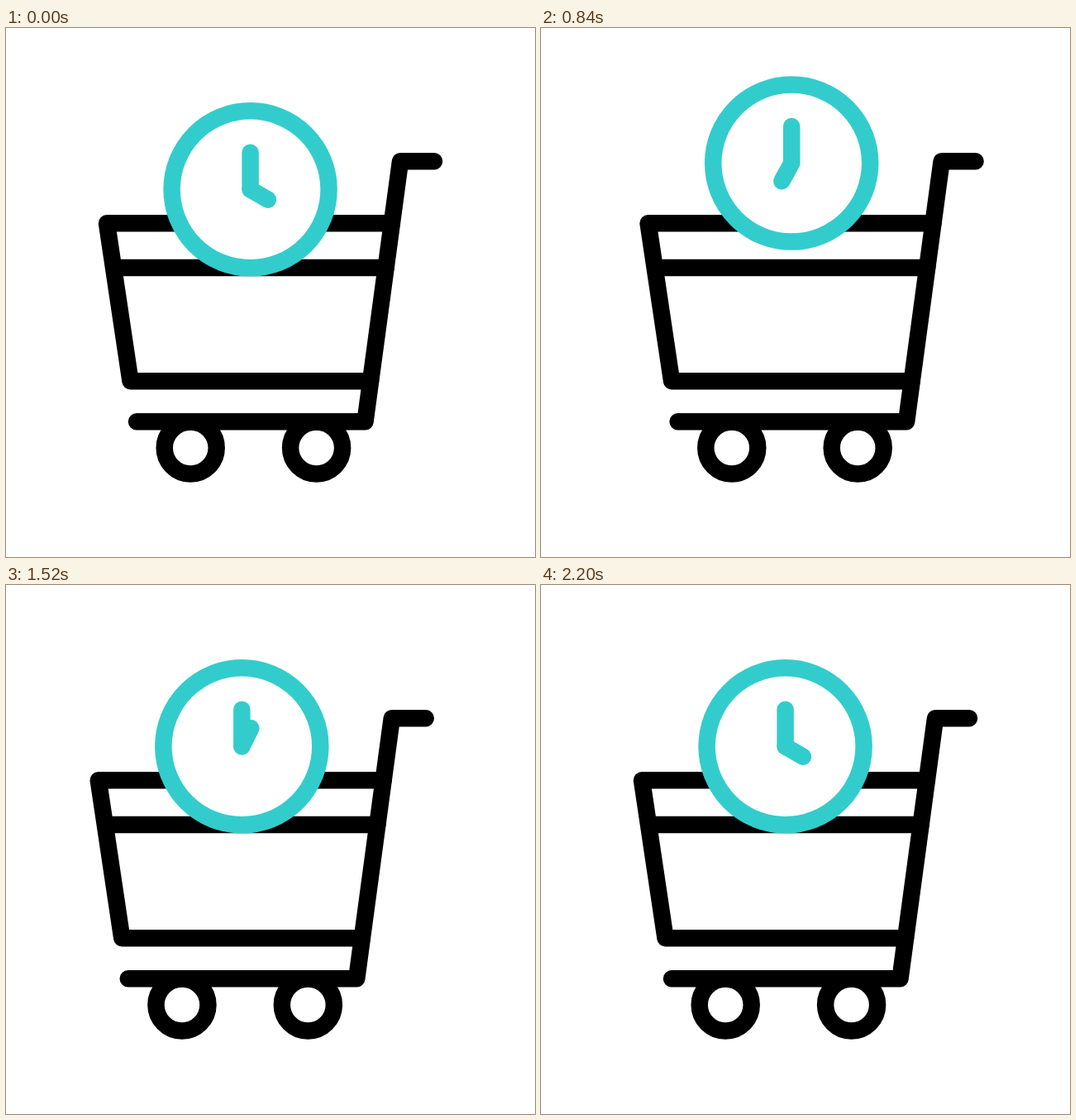
Animation of 640 by 640 pixels, one loop 2.4 s. Source, as an HTML page:

```html
<!DOCTYPE html>
<html lang="en">
<head>
<meta charset="utf-8">
<title>Shopping cart with clock</title>
<style>
  html, body { margin: 0; width: 100%; height: 100%; overflow: hidden; background: #fff; }
  svg { display: block; width: 100%; height: 100%; }
  .ink, .accent { fill: none; stroke-width: 20.5; stroke-linecap: round; stroke-linejoin: round; }
  .ink { stroke: #000; }
  .accent { stroke: #33cccc; }
</style>
</head>
<body>
<svg viewBox="0 0 640 640">
  <g id="cart">
    <g class="ink">
      <path d="M518 161.3H477L434.5 476.3H158"/>
      <path d="M466.9 236.2H122L150.5 427.3H441.1M130 290H459.6"/>
      <circle cx="223.2" cy="508" r="31.5"/>
      <circle cx="375.6" cy="508" r="31.5"/>
    </g>
    <g id="clock" class="accent">
      <circle cx="295.6" cy="195.3" r="95" fill="#fff"/>
      <path d="M295.6 150.8V195.3"/>
      <path id="hour" d="M295.6 195.3V170.6"/>
    </g>
    <g class="accent">
      <path class="dash" data-x="380.7" data-y="331.6"/>
      <path class="dash" data-x="223.8" data-y="380.2"/>
    </g>
  </g>
</svg>
<script>
const LOOP = 2400, STEP = 20, UNITS = 120;
const DASH = 136;

const cart = document.getElementById('cart');
const clock = document.getElementById('clock');
const hour = document.getElementById('hour');
const dashes = [...document.querySelectorAll('.dash')];

// Tracks are lists of [time, value], 120 time units per loop.
const shift = [[10, 0], [30, -25.5], [50, 25], [70, -24], [90, 25], [110, 0]];
const tilt = [[10, 0], [25, 4.6], [30, 4.6], [40, 0], [90, 0], [100, 4], [110, 0]];
const jump = [[10, 0], [18, 37.2], [36, 37.2], [65, 0]];
const trims = [
  { head: [[10, 0], [25, 1]], tail: [[25, 0], [40, 1]] },
  { head: [[81, 0], [96, 1]], tail: [[96, 0], [110.9, 1]] }
];

const smooth = u => u * u * (3 - 2 * u);

// Cubic bezier (.25, 0, .75, 1)
function ease(x) {
  let lo = 0, hi = 1;
  for (let i = 0; i < 24; i++) {
    const u = (lo + hi) / 2, v = 1 - u;
    const bx = 0.75 * v * v * u + 2.25 * v * u * u + u * u * u;
    if (bx < x) lo = u; else hi = u;
  }
  return smooth((lo + hi) / 2);
}

function at(keys, time) {
  if (time <= keys[0][0]) return keys[0][1];
  for (let i = 1; i < keys.length; i++) {
    const [t0, a] = keys[i - 1], [t1, b] = keys[i];
    if (time < t1) return a + (b - a) * ease((time - t0) / (t1 - t0));
  }
  return keys[keys.length - 1][1];
}

function drawDashes(time) {
  const trim = trims[time < 60 ? 0 : 1];
  const from = at(trim.tail, time) * DASH, to = at(trim.head, time) * DASH;
  const shown = to - from > 0.1;
  for (const d of dashes) {
    const x = +d.dataset.x;
    d.setAttribute('d', shown ? `M${x + from} ${d.dataset.y}H${x + to}` : '');
  }
}

function draw(ms) {
  const step = Math.floor((ms % LOOP) / STEP);
  const time = step <= 10 ? 0 : step * UNITS / (UNITS - 1);
  const turn = Math.min(1, Math.max(0, (time - 10) / 100));
  cart.setAttribute('transform',
    `translate(${at(shift, time)} 0) rotate(${at(tilt, time)} 421 503)`);
  clock.setAttribute('transform', `translate(0 ${-at(jump, time)})`);
  hour.setAttribute('transform', `rotate(${120 + 360 * smooth(turn)} 295.6 195.3)`);
  drawDashes(time);
}

const start = performance.now();
function tick() {
  draw(performance.now() - start);
  requestAnimationFrame(tick);
}
tick();
</script>
</body>
</html>
```
